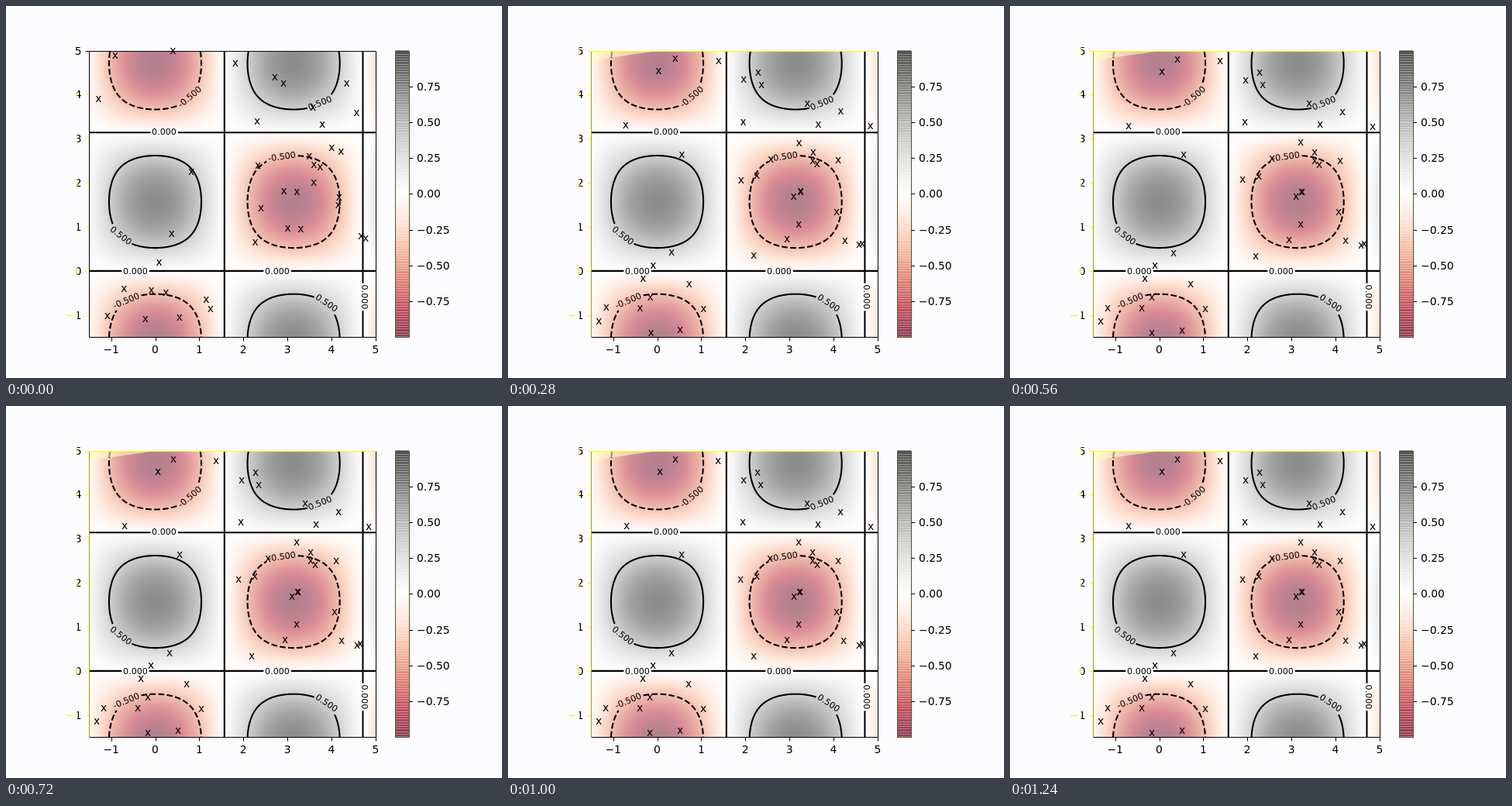
Write an HTML page with a canvas that moves like this. It is 640x480 px and loops after 1.28 s.

```html
<!DOCTYPE html>
<html>
<head>
<meta charset="utf-8">
<style>
html, body { margin: 0; width: 100%; height: 100%; overflow: hidden; background: #fcfcff }
canvas { display: block }
</style>
</head>
<body>
<canvas id="stage" width="640" height="480"></canvas>
<script>
const STEP = 40, LOOP = 1280, YELLOW = '#ffff00', PI = Math.PI;
const FONT = '"DejaVu Sans", sans-serif';
const UNIT = 56.86, X = x => 192.5 + UNIT * x, Y = y => 341.9 - UNIT * y;
const [L, R, T, B] = [107.5, 477.5, 58.5, 427.5];
const snap = v => Math.round(v) + 0.5;
const number = s => String(s).replace('-', '\u2212');

// Diverging red-white-grey map for values -1..1
const RAMP = '67001f b2182b d6604d f4a582 fddbc7 ffffff e0e0e0 bababa 878787 4d4d4d 1a1a1a'
  .split(' ').map(hex => [16, 8, 0].map(bits => parseInt(hex, 16) >> bits & 255));
function ramp(v) {
  const p = (v + 1) * 5, i = Math.min(9, Math.floor(p));
  return RAMP[i].map((c, k) => c + (RAMP[i + 1][k] - c) * (p - i));
}

function line(g, x1, y1, x2, y2, color = '#000') {
  g.strokeStyle = color;
  g.lineWidth = 1;
  g.beginPath();
  g.moveTo(x1, y1);
  g.lineTo(x2, y2);
  g.stroke();
}

function text(g, s, x, y, align, size = 13.9, color = '#000') {
  g.font = size + 'px ' + FONT;
  g.textAlign = align;
  g.fillStyle = color;
  g.fillText(s, x, y);
}

function drawField(g) {
  const w = R - L, h = B - T, img = g.createImageData(w, h);
  for (let j = 0, k = 0; j < h; j++) for (let i = 0; i < w; i++, k += 4) {
    const x = (i + L - X(0)) / UNIT, y = (Y(0) - j - T) / UNIT;
    ramp(Math.cos(x) * Math.sin(y)).forEach((c, n) => img.data[k + n] = (c + 255) / 2);
    img.data[k + 3] = 255;
  }
  g.putImageData(img, Math.floor(L), Math.floor(T));
}

// text, centre x, centre y, degrees
const LABELS = [['0.000', 204, 162, 0], ['0.000', 167, 341.5, 0], ['0.000', 350, 341.5, 0],
  ['0.000', 462.5, 375.5, 90], ['0.500', 148.5, 296, 38], ['-0.500', 237, 117, -40],
  ['0.500', 405, 125, -22], ['-0.500', 356, 194, -8], ['-0.500', 155, 380, -23], ['0.500', 414, 383, 34]];

function visible(x, y) {
  if (x < L || x > R || y < T || y > B) return false;
  return LABELS.every(([s, cx, cy, deg]) => {
    const c = Math.cos(deg * PI / 180), n = Math.sin(deg * PI / 180), dx = x - cx, dy = y - cy;
    return Math.abs(dx * c + dy * n) > s.length * 3 + 2.5 || Math.abs(dy * c - dx * n) > 7;
  });
}

// Strokes the visible runs of a curve; each run, and its dashes, starts after a gap
function trace(g, point, dashed) {
  const N = 1500;
  let start = 0, pen = false;
  const at = i => point(i % N / N);
  while (visible(...at(start)) || !visible(...at(start + 1))) start++;
  g.setLineDash(dashed ? [7.7, 3.3] : []);
  g.beginPath();
  for (let i = start; i < start + N; i++) {
    const [x, y] = at(i), shown = visible(x, y);
    if (shown) pen ? g.lineTo(x, y) : g.moveTo(x, y);
    pen = shown;
  }
  g.stroke();
  g.setLineDash([]);
}

function ring(cx, cy) {
  return p => {
    const u = PI / 3 * Math.sin(2 * PI * p), side = Math.cos(2 * PI * p);
    const v = Math.acos(Math.min(1, 0.5 / Math.cos(u))) * Math.sign(side);
    return [X(cx + u), Y(cy + v)];
  };
}

function drawContours(g) {
  g.strokeStyle = '#000';
  g.lineWidth = 2.08;
  for (const x of [PI / 2, 3 * PI / 2]) trace(g, p => [X(x), 480 * p]);
  for (const y of [0, PI]) trace(g, p => [640 * p, Y(y)]);
  for (const cx of [0, PI]) for (const n of [-1, 1, 3])
    trace(g, ring(cx, n * PI / 2), (n === 1) === (cx > 0));
  for (const [s, x, y, deg] of LABELS) {
    g.save();
    g.translate(x, y);
    g.rotate(deg * PI / 180);
    text(g, s, 0, 4, 'center', 11.1);
    g.restore();
  }
}

function drawAxes(g, tinted) {
  const split = g.createLinearGradient(91, 0, 93, 0);
  split.addColorStop(0, '#f4f400');
  split.addColorStop(1, '#000');
  if (tinted) {
    g.fillStyle = 'rgba(255, 255, 190, .6)';
    g.beginPath();
    g.moveTo(L, T);
    g.lineTo(190, T);
    g.lineTo(L, 70);
    g.fill();
  }
  for (let n = -1; n <= 5; n++) {
    const x = snap(X(n)), y = snap(Y(n)), yellow = tinted || n < 5;
    line(g, x, B, x, B + 5);
    text(g, number(n), X(n), 447.5, 'center');
    line(g, L - 5, y, L, y, yellow ? YELLOW : '#000');
    text(g, number(n), 97.5, Math.round(Y(n) + 5), 'right', 13.9, yellow ? split : '#000');
  }
  line(g, R, T, R, B);
  line(g, L, B, R, B);
  line(g, L, T, L, B, tinted ? '#a0a000' : '#000');
  line(g, L, T, R, T, tinted ? YELLOW : '#000');
}

function drawColorbar(g) {
  const top = 57.6, height = 369.6, cell = height / 256;
  for (let i = 0; i < 256; i++) {
    const y1 = Math.floor(top + i * cell), y2 = Math.ceil(top + (i + 1) * cell);
    g.fillStyle = `rgba(${ramp(1 - i / 127.5).map(Math.round)}, .5)`;
    g.fillRect(502, y1, 18, y2 - y1);
  }
  g.strokeStyle = '#55552a';
  g.lineWidth = 1;
  g.strokeRect(502.5, T, 18, B - T);
  for (let v = -0.75; v < 1; v += 0.25) {
    const y = top + height * (1 - v) / 2;
    line(g, 520.5, snap(y), 525, snap(y));
    text(g, number(v.toFixed(2)), 530, Math.round(y + 5), 'left');
  }
}

function scene(tinted) {
  const canvas = document.createElement('canvas');
  canvas.width = 640;
  canvas.height = 480;
  const g = canvas.getContext('2d');
  g.fillStyle = '#fcfcff';
  g.fillRect(0, 0, 640, 480);
  drawField(g);
  drawContours(g);
  drawAxes(g, tinted);
  drawColorbar(g);
  return canvas;
}

// Where the swarm settles, as x, y pairs
const REST = [196,85, 216,69, 271,71, 304,96, 322,86, 326,102, 386,126, 429,137, 400,153, 303,150,
  300,224, 468,156, 375,176, 393,189, 338,197, 321,220, 393,200, 399,205, 426,200, 224,192,
  376,240, 369,246, 377,240, 424,266, 375,282, 360,302, 433,303, 457,307, 453,309, 317,323,
  211,319, 187,335, 174,352, 233,359, 183,376, 126,390, 170,390, 252,391, 117,407, 222,419,
  183,422, 153,155];

let seed = 7;
const random = () => (seed = seed * 16807 % 2147483647) / 2147483647;

// Each mark starts off to one side, mostly up and right, and is drawn to its rest
const marks = [];
for (let i = 0; i < REST.length; i += 2) {
  const angle = -PI / 4 + (random() - 0.5) * 4, reach = 8 + 60 * random() ** 2;
  marks.push({ x: REST[i], y: REST[i + 1], dx: reach * Math.cos(angle), dy: reach * Math.sin(angle) });
}

const g = document.getElementById('stage').getContext('2d');
const plain = scene(false), tinted = scene(true);

function draw(now) {
  const t = Math.floor(now % LOOP / STEP) * STEP;
  const away = Math.exp(-((t / 150) ** 2));
  g.drawImage(t ? tinted : plain, 0, 0);
  for (const m of marks) {
    const x = m.x + m.dx * away, y = m.y + m.dy * away;
    if (x > L && x < R && y > T - 3 && y < B) text(g, 'x', x, y + 3.8, 'center');
  }
}

const begin = performance.now();
function tick() {
  draw(performance.now() - begin);
  requestAnimationFrame(tick);
}
tick();
</script>
</body>
</html>
```
